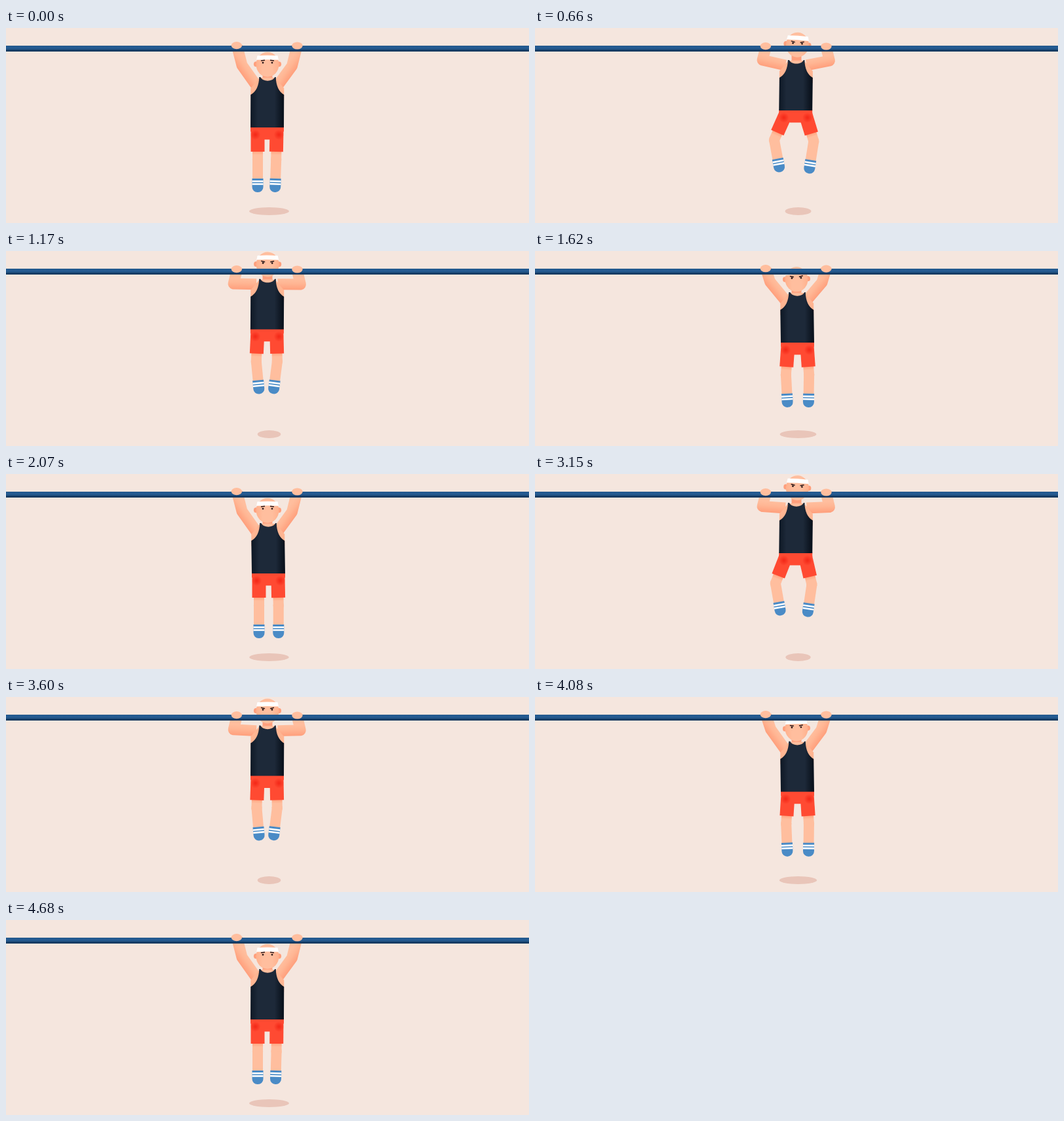
Animation, 800 px wide and 298 px high, one loop 4740 ms. Source, as an HTML page with a canvas:

```html
<!DOCTYPE html>
<html lang="en">
<head>
<meta charset="utf-8">
<title>Pull-ups</title>
<style>
  html, body { margin: 0; height: 100%; overflow: hidden; background: #f5e6de; }
  canvas { display: block; width: 100vw; height: 100vh; }
</style>
</head>
<body>
<canvas width="800" height="298"></canvas>
<script>
const ctx = document.querySelector('canvas').getContext('2d');
const PERIOD = 2370; // one pull-up; the loop holds two
const SKIN = '#ffbe9e', SHADE = '#ff9f7c', RED = '#ff4a32', BLUE = '#4a8bc6';

// Smooth periodic curve through the keys, without overshoot.
function track(times, values) {
  const n = times.length;
  const time = i => times[(i + n) % n] + Math.floor(i / n) * PERIOD;
  const value = i => values[(i + n) % n];
  const slope = i => (value(i + 1) - value(i)) / (time(i + 1) - time(i));
  const tangent = i => {
    const a = slope(i - 1), b = slope(i);
    return a * b > 0 ? 2 * a * b / (a + b) : 0;
  };
  return t => {
    let i = n - 1;
    while (times[i] > t) i--;
    const h = time(i + 1) - time(i), u = (t - time(i)) / h, v = 1 - u;
    return v * v * ((1 + 2 * u) * value(i) + u * h * tangent(i)) +
           u * u * ((3 - 2 * u) * value(i + 1) - v * h * tangent(i + 1));
  };
}

const lift = [0, 390, 540, 660, 900, 1140, 1470, 1620, 1800, 2070];
const bodyY = track(lift, [0, 2, -12, -26, -33, -32.5, -24, -12, -4, 0]);
const headY = track(lift, [0, -1, -18, -30, -36.5, -35.5, -27, -12.5, -4, 0]);
const elbowX = track(lift, [361, 361, 348.5, 348, 348, 348, 350, 359.5, 361, 361]);
const elbowY = track(lift, [57, 58, 52, 49, 50, 50, 48.5, 47, 53, 57]);

const swing = [0, 390, 660, 1230, 1620, 2070, 2310];
const hipX = track(swing, [399.5, 400.5, 398.7, 399.5, 401.5, 401.5, 399.5]);
const headTilt = track(swing, [0, 0, 4, 0, -2, 0, 0]);
const shadowRx = track(swing, [30.5, 28.7, 20, 17.8, 28, 30.3, 30.5]);
const leftThigh = track(swing, [0, 11, 24, 2, 4, 0, 0]);
const leftShin = track(swing, [0, 5, 10.5, 5, 3, 0, 0]);
const rightThigh = track(swing, [-1, 24, 17, 1, 4, 1, -.5]);
const rightShin = track(swing, [2, 14, 9, 7, 1, 0, 1.5]);
const effort = track([0, 230, 390, 1620, 1900], [0, 0, 1, 1, 0]);

function fill(color, draw) {
  ctx.fillStyle = color;
  ctx.beginPath();
  draw();
  ctx.fill();
}
const rect = (color, x, y, w, h) => fill(color, () => ctx.rect(x, y, w, h));
const ellipse = (color, x, y, rx, ry) =>
  fill(color, () => ctx.ellipse(x, y, rx, ry, 0, 0, 7));
const polygon = (color, points) =>
  fill(color, () => points.forEach(p => ctx.lineTo(...p)));

function line(color, width, points) {
  ctx.strokeStyle = color;
  ctx.lineWidth = width;
  ctx.lineJoin = 'round';
  ctx.beginPath();
  points.forEach(p => ctx.lineTo(...p));
  ctx.stroke();
}
function gradient(x0, y0, x1, y1, ...stops) {
  const g = ctx.createLinearGradient(x0, y0, x1, y1);
  stops.forEach(([at, color]) => g.addColorStop(at, color));
  return g;
}
function at(x, y, degrees, draw) {
  ctx.save();
  ctx.translate(x, y);
  ctx.rotate(degrees * Math.PI / 180);
  draw();
  ctx.restore();
}

// Drawn for the left side; the right one is the same, mirrored.
function arm(side, ex, ey, shoulderY) {
  ctx.save();
  if (side > 0) { ctx.translate(798.5, 0); ctx.scale(-1, 1); ey++; }
  const mx = (ex + 383) / 2, my = (ey + shoulderY) / 2;
  const dx = 383 - ex, dy = shoulderY - ey, k = 8.5 / Math.hypot(dx, dy);
  const skin = gradient(mx + dy * k, my - dx * k, mx - dy * k, my + dx * k,
    [0, SKIN], [.4, '#ffb694'], [1, SHADE]);
  line(skin, 17, [[353.5, 28], [ex, ey], [383, shoulderY]]);
  ctx.restore();
}

function leg(side, x, y, thigh, shin) {
  at(x, y, -side * thigh, () => {
    at(0, 45, side * (thigh + shin), () => {
      ellipse(SKIN, 0, 0, 8.2, 8.2);
      rect(SKIN, -8, 0, 16, 32);
      fill(BLUE, () => ctx.roundRect(-8.5, 29, 17, 21, [0, 0, 8, 8]));
      rect('#fff', -8.5, 32, 17, 2.6);
      rect('#fff', -8.5, 36.2, 17, 2.6);
    });
    rect(gradient(0, 33, 0, 38, [0, '#ffa783'], [1, SKIN]), -8, 25, 16, 20);
    rect(RED, -10.5, -4, 21, 37);
  });
}

function shorts(x, y) {
  polygon(RED, [[x - 25.5, y - 1], [x + 25.5, y - 1], [x + 25.5, y + 6],
    [x + 9, y + 18.5], [x - 9, y + 18.5], [x - 25.5, y + 6]]);
  for (const side of [-1, 1]) {
    const cx = x + side * 18, cy = y + 11;
    const g = ctx.createRadialGradient(cx, cy, 1, cx, cy, 8);
    g.addColorStop(0, 'rgba(240,30,16,.7)');
    g.addColorStop(1, 'rgba(240,30,16,0)');
    ellipse(g, cx, cy, 7.5, 8);
  }
}

function shirt(top, hip, y) {
  const cloth = gradient(hip - 25.5, 0, hip + 25.5, 0, [0, '#0e1825'],
    [.22, '#1d2939'], [.72, '#1d2939'], [.95, '#0b131e'], [1, '#0b131e']);
  fill(cloth, () => {
    ctx.moveTo(hip - 25.5, y + 152);
    ctx.lineTo(top - 25.5, y + 102);
    ctx.quadraticCurveTo(top - 13, y + 95, top - 12.5, y + 75);
    ctx.lineTo(top - 10.5, y + 75);
    ctx.bezierCurveTo(top - 7, y + 82.5, top + 8, y + 82.5, top + 11.5, y + 75);
    ctx.lineTo(top + 13, y + 75);
    ctx.quadraticCurveTo(top + 13.5, y + 95, top + 25.5, y + 102);
    ctx.lineTo(hip + 25.5, y + 152);
  });
}

function head(x, y, tilt, anger) {
  at(x, y, tilt, () => {
    for (const side of [-1, 1]) ellipse(SHADE, side * 17.5, -.5, 3.6, 4);
    ellipse(gradient(-18, 0, 18, 0, [0, '#ffb08c'], [.3, SKIN], [.7, SKIN], [1, '#ffb08c']),
      0, 0, 17.5, 19);
    fill('#fff', () => {
      ctx.moveTo(-15.5, -13.5);
      ctx.quadraticCurveTo(0, -14.5, 15.5, -13.5);
      ctx.lineTo(17, -7);
      ctx.quadraticCurveTo(0, -8, -17, -7);
    });
    for (const side of [-1, 1]) {
      ellipse('#2a1718', side * 7, -2.7 + anger * .6, 1.4, 1.4);
      line('#2a1718', 1.5, [[side * 10, -5.8 + anger * .6], [side * 4, -6.6 + anger * 2.8]]);
    }
  });
}

function draw(t) {
  const y = bodyY(t), hip = hipX(t), top = (400 + hip) / 2;
  const ex = elbowX(t), ey = elbowY(t);
  const shoulderY = 88 + y - 5 * (361 - ex) / 13;
  const tilt = headTilt(t);

  rect('#f5e6de', 0, 0, 800, 298);
  ellipse('#e9c5b9', 402.5, 280, shadowRx(t), 6);

  arm(-1, ex, ey, shoulderY);
  arm(1, ex, ey, shoulderY);
  polygon('#ffb592', [[top - 25.5, y + 92], [top - 12, y + 76], [top + 12, y + 76],
    [top + 25.5, y + 92], [top + 25.5, y + 110], [top - 25.5, y + 110]]);
  rect(gradient(0, y + 69, 0, y + 82, [0, SHADE], [.45, SHADE], [.6, SKIN], [1, SKIN]),
    392.5, y + 67, 15, 14);

  leg(-1, hip - 14.5, y + 156, -leftThigh(t) * -1, leftShin(t));
  leg(1, hip + 14.5, y + 156, rightThigh(t), rightShin(t));
  shorts(hip, y + 152);
  shirt(top, hip, y);
  head(400 + Math.max(0, tilt) * .35, 55.8 + headY(t), tilt, effort(t));

  rect(gradient(0, 27, 0, 36, [0, '#215789'], [.25, '#255c94'], [.6, '#215588'],
    [.72, '#173f69'], [1, '#14375c']), 0, 27, 800, 9);
  const press = (361 - ex) / 13;
  ellipse(SKIN, 352.8, 26.6 + press, 8.2, 5.6);
  ellipse(SKIN, 445.5, 27 + press, 8.2, 5.6);
}

function frame(now) {
  draw(now % PERIOD);
  requestAnimationFrame(frame);
}
requestAnimationFrame(frame);
</script>
</body>
</html>
```
